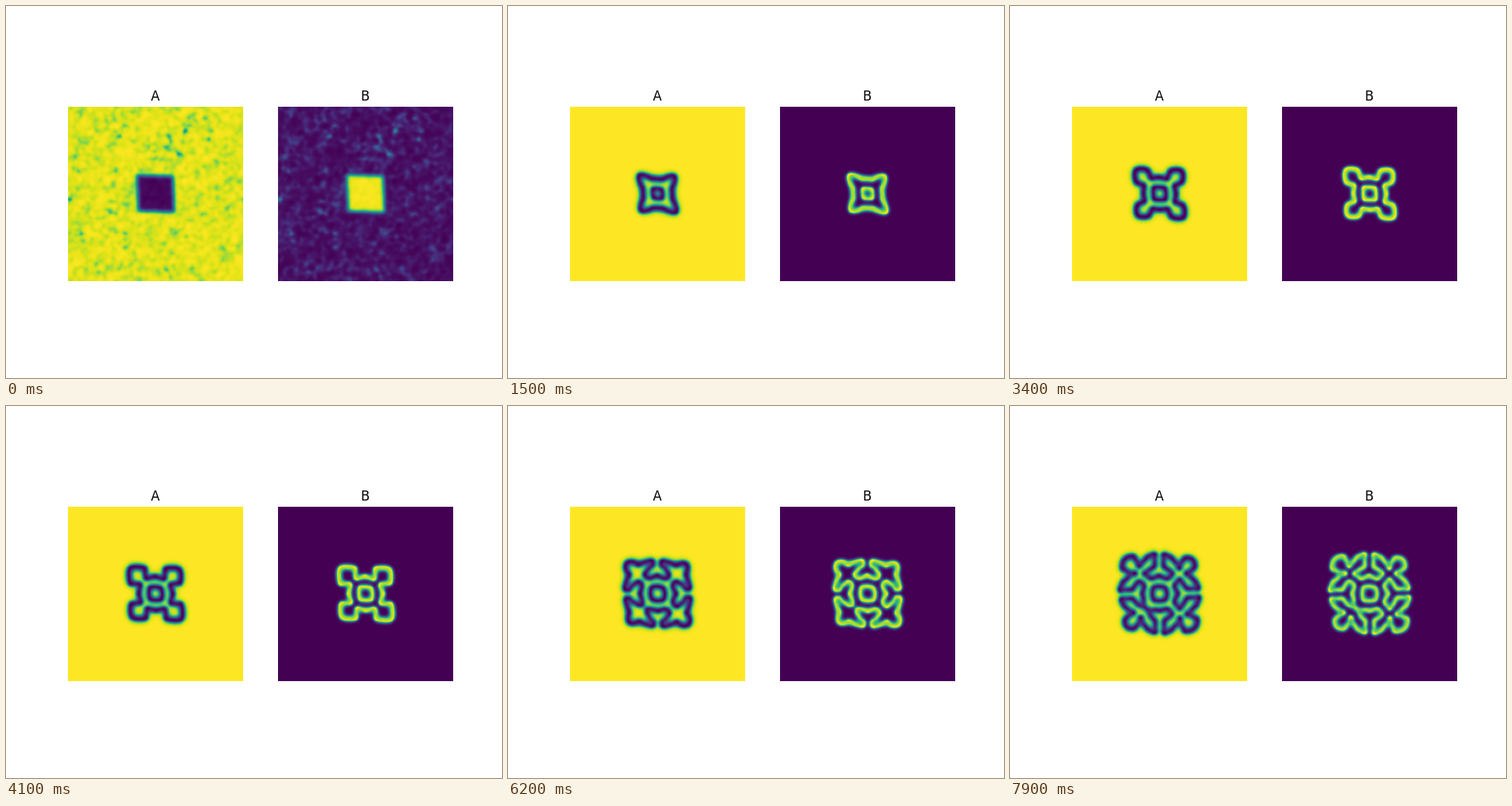
Write a matplotlib script that moves like this. It is 640 by 480 pixels and loops after 8000 ms.

```python
import numpy as np
import matplotlib.pyplot as plt
from matplotlib.animation import FuncAnimation

N, HALF = 200, 20.6               # grid size, half side of the seeded square
SHEAR = 0.04                      # leans the square along one diagonal
BLUR = 12                         # diffusion passes that soften the start
DA, DB, FEED, KILL = 0.16, 0.08, 0.060, 0.062
FRAMES, INTERVAL = 80, 100
FINAL_RADIUS = 47.7               # half size of the colony in the last picture
MAX_RATE = 60


def laplacian(m):
    return (np.roll(m, 1, 0) + np.roll(m, -1, 0)
            + np.roll(m, 1, 1) + np.roll(m, -1, 1) - 4 * m)


def blur(m):
    for _ in range(BLUR):
        m = m + 0.2 * laplacian(m)
    return m


def step(a, b):
    r = a * b * b
    return (a + DA * laplacian(a) - r + FEED * (1 - a),
            b + DB * laplacian(b) + r - (FEED + KILL) * b)


def run(a, b, n):
    for _ in range(n):
        a, b = step(a, b)
    return a, b


def initial_state():
    """Soft square of B in a background of faint, skewed speckles."""
    rng = np.random.default_rng(12)
    y, x = np.mgrid[:N, :N] - (N - 1) / 2
    edge = np.maximum(abs(x - SHEAR * y), abs(y - SHEAR * x))
    square = blur(np.clip(HALF - edge + 0.5, 0, 1))
    noise = blur(rng.standard_normal((N, N)))
    noise /= noise.std()
    speckle = 0.055 * np.exp(0.55 * noise)
    level = square * (0.97 + 0.008 * noise) + (1 - square) * speckle
    return ((0.98 - 0.52 * level).astype(np.float32),
            (0.27 * level).astype(np.float32))


def radius(b):
    rows, cols = np.nonzero(b > 0.1)
    return (np.ptp(rows) + np.ptp(cols)) / 4 if rows.size else 0


def growth_rate(a, b):
    """Steps per picture so that the colony reaches its final size."""
    limit = MAX_RATE * (FRAMES - 1)
    n = 0
    while n < limit and (n < 200 or radius(b) < FINAL_RADIUS):
        a, b = run(a, b, 20)
        n += 20
    return round(n / (FRAMES - 1))


def simulate():
    states = [initial_state()]
    rate = growth_rate(*states[0])
    while len(states) < FRAMES:
        states.append(run(*states[-1], rate))
    return states


states = simulate()
fig, axes = plt.subplots(1, 2, figsize=(6.4, 4.8), dpi=100)
images = []
for ax, field, name in zip(axes, states[0], "AB"):
    images.append(ax.imshow(field, cmap="viridis"))
    ax.set_title(name, pad=5.4)
    ax.axis("off")


def update(i):
    for im, field in zip(images, states[i]):
        im.set_data(field)
        im.set_clim(field.min(), field.max())
    return images


anim = FuncAnimation(fig, update, frames=FRAMES, interval=INTERVAL,
                     repeat=True, repeat_delay=0)
plt.show()
```
